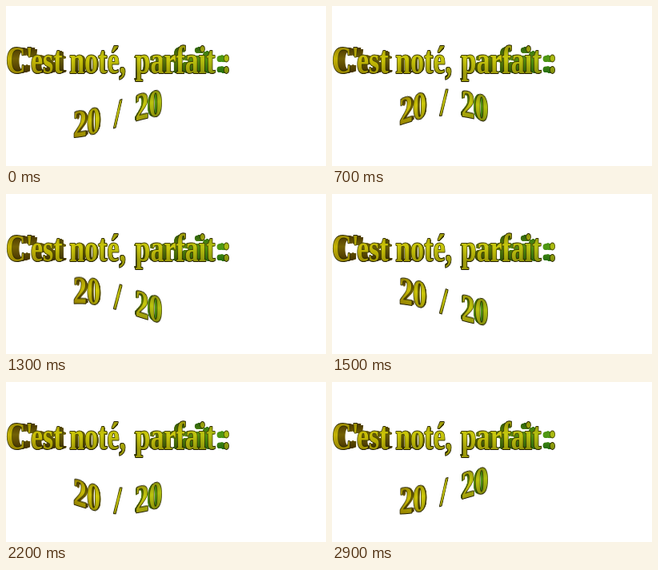
An HTML page with a canvas for the animation above (3000 ms loop, 400x200 px).

```html
<!DOCTYPE html>
<html lang="fr">
<head>
<meta charset="utf-8">
<title>20 / 20</title>
<style>
  html, body { margin: 0; width: 100%; height: 100%; overflow: hidden; background: #fff; }
  canvas { display: block; }
</style>
</head>
<body>
<canvas id="stage" width="400" height="200" aria-label="C'est noté, parfait : 20 / 20"></canvas>
<script>
const ctx = document.getElementById('stage').getContext('2d');
const LOOP = 3000, STEP = 100;
const CENTER = 140, TALL = 1.4;
const WAVE = { mean: 150.5, height: 14, length: 265, crestX: 100, crestTime: 2700 };

function gradient(g, x0, x1, colors) {
  const fill = g.createLinearGradient(x0, 0, x1, 0);
  colors.forEach((color, i) => fill.addColorStop(i / (colors.length - 1), color));
  return fill;
}

// Raised lettering whose depth recedes towards the vertical axis x = CENTER.
function relief(parts, baseline, x0, x1) {
  const layer = document.createElement('canvas');
  layer.width = 400;
  layer.height = 100;
  const g = layer.getContext('2d');
  g.font = 'bold 34px "Liberation Serif", "Times New Roman", serif';
  g.lineJoin = 'round';

  const place = (scale, draw) => {
    g.setTransform(scale, 0, 0, TALL * scale, CENTER * (1 - scale), baseline - 14 * (1 - scale));
    for (const [text, x] of parts) draw(text, x);
  };

  g.fillStyle = gradient(g, x0, x1, ['#4a3200', '#3a2c00', '#343400', '#2c5a08', '#1c8414']);
  for (let scale = 0.93; scale < 1; scale += 0.004) {
    place(scale, (text, x) => g.fillText(text, x, 0));
  }
  g.strokeStyle = '#1c1a00';
  g.lineWidth = 1.5;
  place(1, (text, x) => g.strokeText(text, x, 0));
  g.fillStyle = gradient(g, x0, x1, ['#b49c00', '#c4bc04', '#bcbc08', '#c0c00c', '#94ac10']);
  place(1, (text, x) => g.fillText(text, x, 0));

  // Soft light across the upper part of the faces.
  g.setTransform(1, 0, 0, 1, 0, 0);
  g.globalCompositeOperation = 'source-atop';
  const light = g.createLinearGradient(0, baseline - 33, 0, baseline);
  light.addColorStop(0, 'rgba(70, 60, 0, .25)');
  light.addColorStop(0.45, 'rgba(240, 240, 20, .25)');
  light.addColorStop(1, 'rgba(60, 50, 0, .25)');
  g.fillStyle = light;
  g.fillRect(0, 0, 400, 100);
  return layer;
}

const title = relief([["C'", 0], ['est noté,', 31], ['parfait :', 161.5]], 84, 0, 281);
const score = relief([['20\u00a0\u00a0/\u00a0\u00a020', 84]], 60, 84, 196);

function draw(now) {
  const time = Math.floor(now % LOOP / STEP) * STEP;
  ctx.clearRect(0, 0, 400, 200);
  ctx.drawImage(title, 0, 0);
  for (let x = 80; x < 200; x++) {
    const phase = (time - WAVE.crestTime) / LOOP + (x - WAVE.crestX) / WAVE.length;
    const y = WAVE.mean + WAVE.height * Math.cos(2 * Math.PI * phase);
    ctx.drawImage(score, x, 0, 1, 100, x, y - 60, 1, 100);
  }
}

const start = performance.now();
function tick() {
  draw(performance.now() - start);
  requestAnimationFrame(tick);
}
tick();
</script>
</body>
</html>
```
